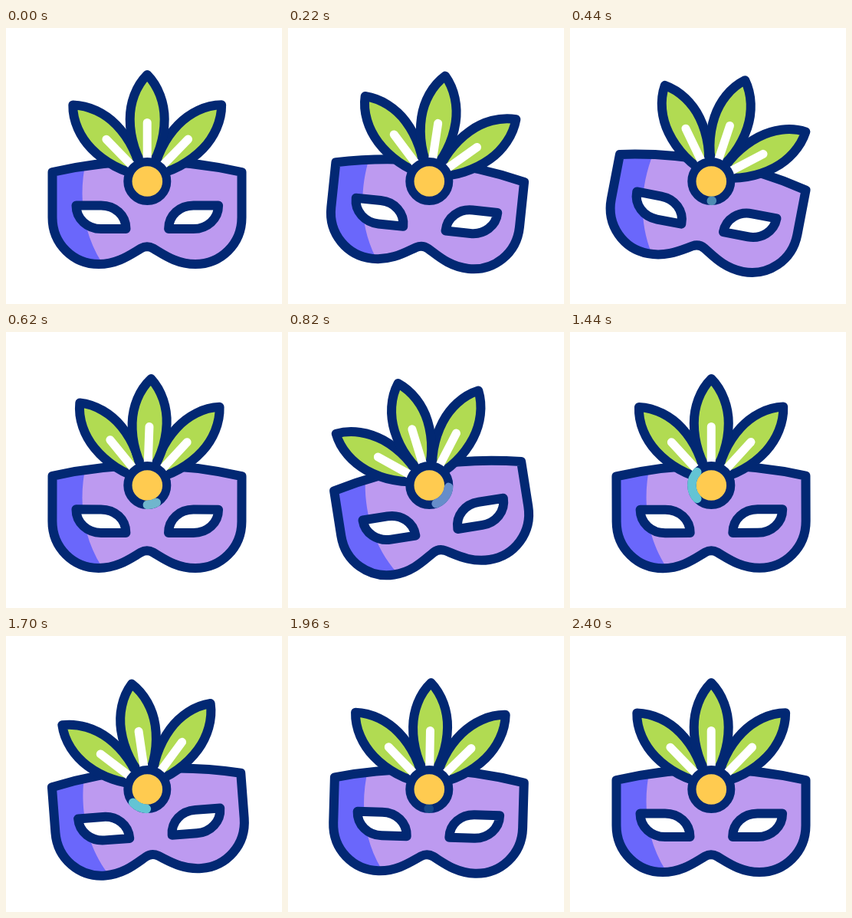
Animation of 360x360 px, one loop 2.42 s. Source, as an HTML page:

```html
<!DOCTYPE html>
<html lang="en">
<head>
<meta charset="utf-8">
<title>Carnival mask</title>
<style>
  html, body { margin: 0; width: 100%; height: 100%; overflow: hidden; background: #fff; }
  svg { display: block; width: 100vw; height: 100vh; }
  .line { stroke: #022873; stroke-width: 12; stroke-linejoin: round; stroke-linecap: round; }
  .shine { stroke: #fff; stroke-width: 11; stroke-linecap: round; }
  .ring { stroke: #022873; stroke-width: 11.2; }
</style>
</head>
<body>
<svg viewBox="0 0 360 360" fill="none">
  <defs>
    <path id="shape" d="M60.5 188 Q122 174 184 174 Q246 174 307.500 188 V247 C307.5 282 280 308 247 308
      C222 308 205 295 192 287.5 Q184 283 176 287.5 C163 295 146 308 121 308 C88 308 60.5 282 60.5 247 Z"/>
    <path id="eye" class="line" fill="#fff"
      d="M91.5 231.5 H124 C142 231.5 156.5 244 156.5 262 H124 C106 262 91.5 249 91.5 231.5 Z"/>
    <g id="leaf">
      <path class="line" fill="#b1db52"
        d="M184.2 61 C169 76 161.7 98 161.7 119 C161.7 143 170 171 184.2 187 C198.4 171 206.7 143 206.7 119 C206.7 98 199 76 184.2 61 Z"/>
      <path class="shine" d="M184.2 123.5 V180"/>
    </g>
    <clipPath id="inside"><use href="#shape"/></clipPath>
  </defs>
  <g id="mask">
    <use href="#shape" fill="#bd9af0"/>
    <path clip-path="url(#inside)" fill="#6a67fb" d="M50 170 H105 C95 212 97 262 125 306 V320 H50 Z"/>
    <use href="#shape" class="line"/>
    <use href="#eye"/>
    <use href="#eye" transform="matrix(-1 0 0 1 368.6 0)"/>
  </g>
  <use id="left" href="#leaf"/>
  <use id="right" href="#leaf"/>
  <use id="middle" href="#leaf"/>
  <circle class="ring" cx="184.3" cy="200" r="25.4" fill="#ffcb50"/>
  <path id="glint" stroke-width="11.6" stroke-linecap="round"/>
</svg>
<script>
  const LOOP = 2420, CX = 184.3, CY = 200, R = 25.4;
  const $ = id => document.getElementById(id);

  // Swing steps: time, mask angle, feather angle
  const swing = [
    [0, 0, 0], [420, 11, 18.5], [800, -9, -17], [1210, 7, 10],
    [1620, -5, -9], [2020, 2, 2], [2370, 0, 0]
  ];
  const feathers = [
    { el: $('left'), rest: -44.2, lag: 40 },
    { el: $('middle'), rest: 0, lag: 20 },
    { el: $('right'), rest: 44.2, lag: -4 }
  ];
  const tints = [
    [620, 112, 182, 205], [1040, 92, 97, 198], [1440, 99, 196, 212]
  ];

  const clamp = x => Math.min(1, Math.max(0, x));
  const ease = x => (1 - Math.cos(Math.PI * clamp(x))) / 2;

  function sample(steps, t, col, curve) {
    if (t <= steps[0][0]) return steps[0][col];
    for (let i = 1; i < steps.length; i++) {
      const a = steps[i - 1], b = steps[i];
      if (t < b[0]) return a[col] + (b[col] - a[col]) * curve((t - a[0]) / (b[0] - a[0]));
    }
    return steps[steps.length - 1][col];
  }

  const turn = (el, deg) => el.setAttribute('transform', `rotate(${deg.toFixed(3)} ${CX} ${CY})`);

  // Degrees travelled counter-clockwise from the bottom of the ring
  function ringPoint(deg) {
    const a = (90 - deg) * Math.PI / 180;
    return `${(CX + R * Math.cos(a)).toFixed(2)} ${(CY + R * Math.sin(a)).toFixed(2)}`;
  }

  function drawGlint(t) {
    const glint = $('glint');
    const alpha = clamp((t - 370) / 100) * clamp((2000 - t) / 200);
    const head = 360 * ease((t - 370) / 1400);
    const tail = 360 * ease((t - 600) / 1440);
    const end = Math.max(head, tail + 0.5);
    const rgb = [1, 2, 3].map(c => Math.round(sample(tints, t, c, clamp)));
    glint.setAttribute('opacity', alpha);
    glint.setAttribute('stroke', `rgb(${rgb})`);
    glint.setAttribute('d',
      `M${ringPoint(tail)} A${R} ${R} 0 ${end - tail > 180 ? 1 : 0} 0 ${ringPoint(end)}`);
  }

  function draw(t) {
    turn($('mask'), sample(swing, t, 1, ease));
    for (const f of feathers) turn(f.el, f.rest + sample(swing, t - f.lag, 2, ease));
    drawGlint(t);
  }

  const start = performance.now();
  function tick() {
    draw((performance.now() - start) % LOOP);
    requestAnimationFrame(tick);
  }
  draw(0);
  requestAnimationFrame(tick);
</script>
</body>
</html>
```
